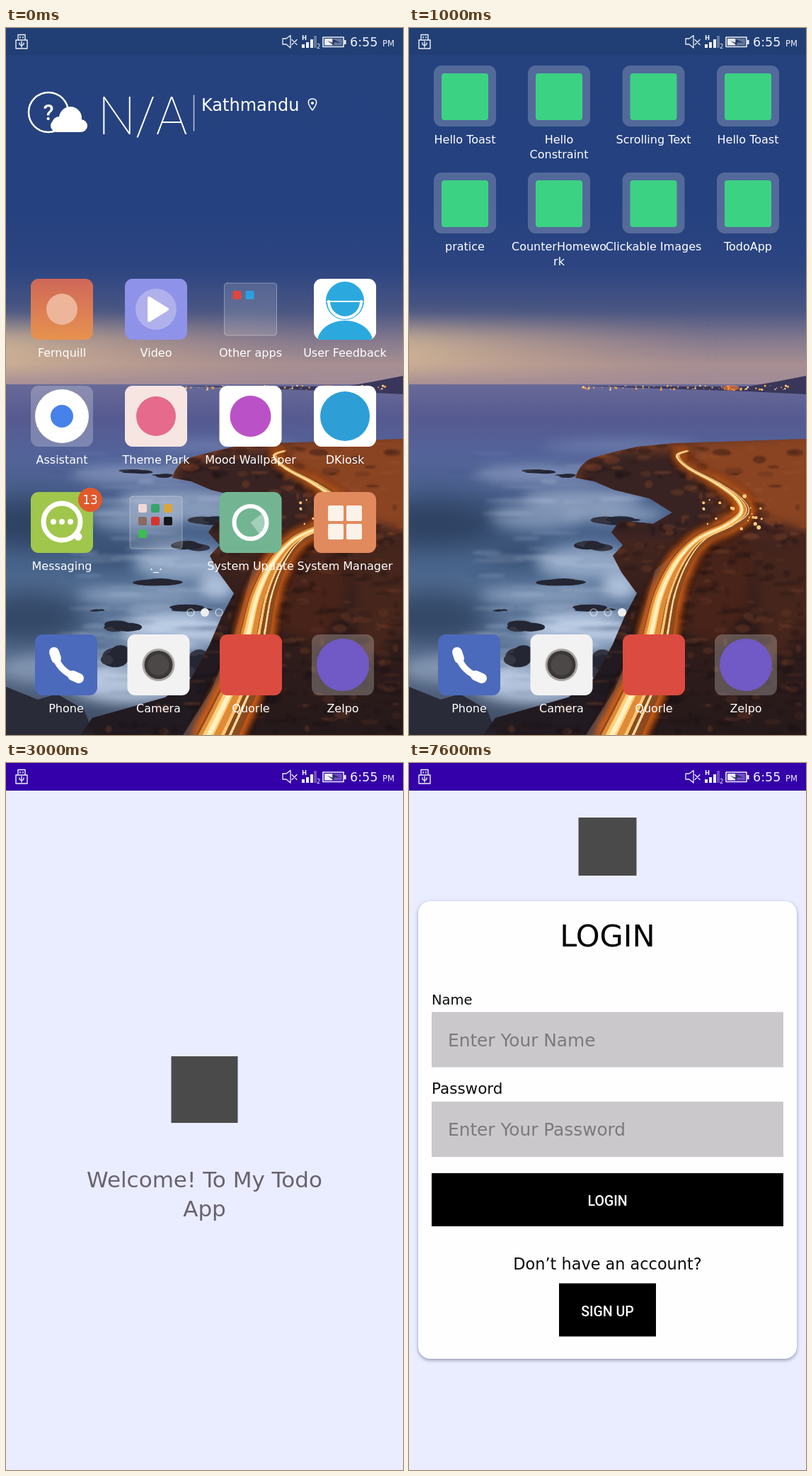
Recreate the animation shown at these times as an HTML page with a canvas. Size 561 px wide and 998 px high, loop 8 s.

```html
<!DOCTYPE html>
<html lang="en">
<head>
<meta charset="utf-8">
<title>Todo app launch</title>
<style>
html, body { margin: 0; width: 100%; height: 100%; overflow: hidden; }
canvas { display: block; width: 100%; height: 100%; }
</style>
</head>
<body>
<canvas id="stage" width="561" height="998"></canvas>
<script>
const W = 561, H = 998, LOOP = 8000;
const HAND = '"DejaVu Sans", sans-serif', UI = 'Roboto, sans-serif';
const stage = document.getElementById('stage').getContext('2d');
let c = stage;

// ---------- helpers ----------
const clamp = v => Math.min(1, Math.max(0, v));
const remain = (t, start, dur, pow) => (1 - clamp((t - start) / dur)) ** pow;
let seed = 7;
const rnd = () => (seed = seed * 16807 % 2147483647) / 2147483647;

function rect(x, y, w, h, fill, r = 0) {
  c.fillStyle = fill;
  c.beginPath();
  c.roundRect(x, y, w, h, r);
  c.fill();
}
function disc(x, y, r, fill, ry = r) {
  c.fillStyle = fill;
  c.beginPath();
  c.ellipse(x, y, r, ry, 0, 0, 7);
  c.fill();
}
function ring(x, y, r, color, w, from = 0, to = 7) {
  c.strokeStyle = color;
  c.lineWidth = w;
  c.beginPath();
  c.arc(x, y, r, from, to);
  c.stroke();
}
function line(path, color, w) {
  c.strokeStyle = color;
  c.lineWidth = w;
  c.stroke(new Path2D(path));
}
function shape(path, fill) {
  c.fillStyle = fill;
  c.fill(new Path2D(path));
}
function text(s, x, y, size, color = '#fff', align = 'left', family = HAND, weight = 400) {
  c.font = `${weight} ${size}px ${family}`;
  c.textAlign = align;
  c.fillStyle = color;
  c.fillText(s, x, y);
}
function gradient(y0, y1, ...stops) {
  const g = c.createLinearGradient(0, y0, 0, y1);
  stops.forEach(([y, color]) => g.addColorStop((y - y0) / (y1 - y0), color));
  return g;
}

// ---------- wallpaper, painted once ----------
const LAND = 'M235 635Q242 612 262 606L292 598 322 591 375 586 440 584 561 580V998H105L122 974 165 962' +
  ' 225 945 262 918 288 870 305 830 322 798 300 768 288 745 302 730 286 712 298 695 345 700 372 684 340 664 290 652 262 640Z';
const FOAM = [[300, 590, 110, 6, .3], [180, 630, 90, 12, .4], [245, 665, 85, 14, .5], [180, 690, 65, 18, .4],
  [290, 686, 70, 9, .6], [250, 755, 70, 24, .55], [190, 800, 90, 12, .45], [240, 850, 75, 28, .8],
  [175, 925, 85, 28, .8], [80, 905, 90, 22, .35], [298, 788, 26, 20, .75]];
const ROCKS = [[185, 626, 24, 3], [220, 632, 16, 3], [215, 782, 44, 7], [168, 845, 34, 9], [290, 696, 32, 7],
  [248, 820, 42, 5], [265, 730, 30, 8], [155, 886, 26, 17], [130, 822, 10, 2], [270, 900, 24, 20]];
// x, y, width along the road
const ROAD = [[394, 597, 5], [380, 604, 7], [396, 621, 8], [435, 642, 11], [466, 664, 15], [474, 684, 19],
  [452, 702, 18], [412, 722, 20], [384, 755, 30], [364, 800, 38], [353, 850, 44], [342, 905, 50], [320, 955, 54], [296, 1005, 58]];

function road(color, share, shift = 0) {
  c.strokeStyle = color;
  for (let i = 0; i < ROAD.length - 1; i++) {
    const [p, q] = [ROAD[i], ROAD[i + 1]];
    const r = ROAD[i + 2] || q, o = ROAD[i - 1] || p;
    const spline = (k, u) => .5 * (2 * p[k] + (q[k] - o[k]) * u +
      (2 * o[k] - 5 * p[k] + 4 * q[k] - r[k]) * u * u + (3 * p[k] - o[k] - 3 * q[k] + r[k]) * u ** 3);
    for (let u = 0; u < 1; u += .1) {
      const w = spline(2, u), v = u + .1;
      c.lineWidth = w * share;
      c.beginPath();
      c.moveTo(spline(0, u) + shift * w, spline(1, u));
      c.lineTo(spline(0, v) + shift * spline(2, v), spline(1, v));
      c.stroke();
    }
  }
}

function paintWallpaper() {
  const layer = document.createElement('canvas');
  layer.width = W;
  layer.height = H;
  c = layer.getContext('2d');
  c.lineCap = c.lineJoin = 'round';

  rect(0, 0, W, 504, gradient(0, 504, [0, '#25427f'], [250, '#25417f'], [340, '#2d4581'], [400, '#4a5683'],
    [440, '#84798e'], [475, '#a78f92'], [504, '#a18a97']));
  const glow = c.createLinearGradient(0, 0, 420, 0);
  glow.addColorStop(0, 'rgba(238,205,150,.6)');
  glow.addColorStop(1, 'rgba(220,170,130,0)');
  c.filter = 'blur(16px)';
  rect(-40, 422, 520, 66, glow);
  c.filter = 'none';

  rect(0, 503, W, 495, gradient(503, 998, [503, '#686a98'], [550, '#565a90'], [600, '#53639a'],
    [680, '#486089'], [760, '#4b678e'], [870, '#667e9f'], [998, '#3a465c']));
  c.filter = 'blur(18px)';
  [[35, 700, 95, 36], [30, 835, 85, 40], [150, 740, 40, 14]].forEach(([x, y, w, h]) => disc(x, y, w, 'rgba(38,57,86,.75)', h));
  c.filter = 'blur(9px)';
  FOAM.forEach(([x, y, w, h, a]) => disc(x, y, w, `rgba(203,218,240,${a})`, h));
  c.filter = 'blur(2px)';
  for (let i = 0; i < 110; i++) {
    const y = 600 + rnd() * 340;
    disc(90 + rnd() * 220, y, 12 + rnd() * 40, `rgba(${i % 2 ? '225,235,250' : '60,82,118'},.16)`, 1 + rnd() * 3);
  }
  c.filter = 'none';
  ROCKS.forEach(([x, y, w, h]) => {
    for (let i = 0; i < 6; i++)
      disc(x + (rnd() - .5) * w, y + (rnd() - .5) * h, w * (.3 + rnd() * .4), i % 3 ? '#242634' : '#343442', h * (.3 + rnd() * .5));
  });

  // distant shore and its lights
  shape('M240 505L360 506 480 506 520 499 561 491V517L480 513 360 509Z', '#38365a');
  for (let i = 0; i < 75; i++)
    disc(245 + rnd() * 310, 505 + rnd() * 6, .6 + rnd() * 1.1, i % 3 ? '#f0a04e' : '#ffd28a');
  disc(455, 508, 12, 'rgba(255,130,50,.6)', 4);

  // headland
  shape(LAND, gradient(580, 998, [580, '#6b3826'], [640, '#6e3820'], [700, '#4a2820'], [800, '#341e1b'], [998, '#26191a']));
  shape('M0 930L45 948 72 940 110 962 125 998H0Z', '#292b38');
  c.save();
  c.clip(new Path2D(LAND));
  c.filter = 'blur(7px)';
  shape('M400 590L570 575V712L500 690Q470 650 420 628Z', '#8a4422');
  shape('M235 625L300 598 370 600 430 655 430 700 380 720 290 720Z', '#382322');
  shape('M395 735L440 710 490 730 480 820 440 870 385 850Z', '#472319');
  shape('M490 745L570 730V850L500 900Z', '#46261c');
  shape('M100 960L270 900 300 840 330 860 270 998H100Z', '#211a20');
  c.filter = 'blur(.8px)';
  for (let i = 0; i < 620; i++) {
    const x = 110 + rnd() * 450, y = 585 + rnd() * 413;
    const tone = rnd() < .55 ? '22,14,18' : y < 730 ? '160,82,42' : '118,64,42';
    disc(x, y, 2 + rnd() * 11, `rgba(${tone},${.15 + rnd() * .25})`, 1 + rnd() * 5);
  }
  c.filter = 'none';
  shape('M348 765L372 745 350 840 318 925 275 998H250L290 935 325 850Z', '#51454a');
  c.filter = 'blur(6px)';
  road('rgba(214,98,24,.35)', 1.15);
  c.filter = 'none';
  road('#8c4a20', .95);
  road('#e08a38', .5, -.2);
  road('#ffd27c', .24, -.24);
  road('#fff1c4', .11, -.22);
  road('#ffc873', .08, .12);
  road('#ffdf9c', .06, .3);
  for (let i = 0; i < 24; i++) disc(415 + rnd() * 85, 660 + rnd() * 52, 1 + rnd() * 2, '#ffcb80');
  c.restore();

  rect(0, 0, W, 38, 'rgba(20,50,80,.22)');
  c = stage;
  return layer;
}
const wallpaper = paintWallpaper();

// ---------- home screen ----------
const COLS = [79, 212, 345.5, 479];
const GLASS = 'rgba(255,255,255,.24)';

function icon(x, y, label, fill, art) {
  if (fill) rect(x - 44, y - 43, 88, 86, fill, 11);
  c.save();
  c.translate(x, y);
  if (art) art();
  c.restore();
  label.split('\n').forEach((s, i) => text(s, x, y + 67 + i * 21, 16, '#fff', 'center'));
}
const dot = (color, r) => () => disc(0, 0, r, color);
function folder(colors) {
  return () => {
    rect(-37, -37, 74, 74, 'rgba(255,255,255,.14)', 4);
    c.strokeStyle = 'rgba(255,255,255,.35)';
    c.lineWidth = 1;
    c.stroke();
    colors.forEach((color, i) => rect(-25 + i % 3 * 18, -26 + (i / 3 | 0) * 18, 12, 12, color, 2));
  };
}
function play() {
  disc(0, 0, 29, 'rgba(225,220,240,.4)');
  const tri = 'M-10-16L16 0-10 16Z';
  shape(tri, '#fff');
  line(tri, '#fff', 4);
}
function person() {
  c.beginPath();
  c.roundRect(-44, -43, 88, 86, 11);
  c.clip();
  disc(0, -12, 27, '#2ba9df');
  ring(0, -11, 23, '#fff', 4, 0, Math.PI);
  line('M-25-11H25', '#fff', 2);
  disc(0, 46, 39, '#2ba9df', 30);
}
function chat() {
  ring(0, -1, 26, '#fff', 7);
  [-12, 0, 12].forEach(x => disc(x, -1, 4, '#fff'));
  disc(23, 20, 5.5, '#fff');
  disc(40, -32, 17, '#e0592c');
  text('13', 40, -26, 17, '#fff', 'center');
}
function update() {
  ring(0, 0, 23, '#fff', 6);
  shape('M0 0L18-14A23 23 0 0 1 14 18Z', 'rgba(255,255,255,.35)');
}
function grid() {
  [-24, 2].forEach(x => [-24, 2].forEach(y => rect(x, y, 22, 22, '#fbf2ea', 2)));
}
function handset() {
  line('M-17-17Q-11 10 17 18', '#fff', 9);
  line('M-17-18L-14-9M9 15L18 19', '#fff', 14);
}
function lens() {
  disc(0, 0, 23, '#aaa5a2');
  disc(0, 0, 20, '#3b3838');
  disc(0, 0, 15, '#4c4848');
}

function weather() {
  ring(60, 119, 28, '#fff', 2.5);
  text('?', 60, 130, 31, '#fff', 'center', UI, 500);
  rect(63, 129, 52, 18, '#fff', 9);
  disc(91, 127, 16, '#fff');
  disc(75, 135, 10, '#fff');
  text('N/A', 130, 150, 75, '#fff', 'left', UI, 100);
  line('M265.5 95V145', 'rgba(255,255,255,.7)', 1.5);
  text('Kathmandu', 276, 117, 24);
  line('M433 116C424 105 427 100 433 100S442 105 433 116Z', '#fff', 1.5);
  disc(433, 106, 2, '#fff');
}

function appsPage() {
  weather();
  const [a, b, d, e] = COLS;
  icon(a, 397, 'Fernquill', gradient(354, 440, [354, '#cf6759'], [440, '#e7924f']), dot('#edb59a', 22));
  icon(b, 397, 'Video', '#8f92e9', play);
  icon(d, 397, 'Other apps', null, folder(['#e0463c', '#2f9fdc']));
  icon(e, 397, 'User Feedback', '#fff', person);
  icon(a, 548, 'Assistant', GLASS, () => { disc(0, 0, 38, '#fff'); disc(0, 0, 16, '#4682ea'); });
  icon(b, 548, 'Theme Park', '#f6e5e1', dot('#e56a8b', 28));
  icon(d, 548, 'Mood Wallpaper', '#fff', dot('#bb51c6', 29));
  icon(e, 548, 'DKiosk', '#fff', dot('#2d9fd6', 35));
  icon(a, 698, 'Messaging', '#a0c64c', chat);
  icon(b, 698, '._.', null, folder(['#f0d8d8', '#35a36a', '#d9a63c', '#8a6a60', '#d8322c', '#151519', '#3dbb57']));
  icon(d, 698, 'System Update', '#73b593', update);
  icon(e, 698, 'System Manager', '#e18a5d', grid);
}
const PROJECTS = ['Hello Toast', 'Hello\nConstraint', 'Scrolling Text', 'Hello Toast',
  'pratice', 'CounterHomewo\nrk', 'Clickable Images', 'TodoApp'];
function projectsPage() {
  PROJECTS.forEach((name, i) => icon(COLS[i % 4], i < 4 ? 96 : 247, name, 'rgba(255,255,255,.21)',
    () => rect(-33, -32, 66, 66, '#3cd283', 4)));
}

// off: distance from the centred position, in screens
function page(off, draw) {
  const far = Math.abs(off), alpha = 1 - 1.5 * far;
  if (alpha <= 0) return;
  c.save();
  c.globalAlpha = alpha;
  c.translate(280 + off * W, 413);
  c.scale(1 - .53 * far, 1 - .53 * far);
  c.translate(-280, -413);
  draw();
  c.restore();
}

function home(t) {
  c.drawImage(wallpaper, 0, 0);
  const off = remain(t, 465, 535, 5);
  page(off - 1, appsPage);
  page(off, projectsPage);
  const active = off > .5 ? 1 : 2;
  [261, 281, 301].forEach((x, i) => i === active ? disc(x, 825, 6, '#eee') : ring(x, 825, 5, 'rgba(255,255,255,.5)', 1.6));
  icon(85, 899, 'Phone', '#4b6abc', handset);
  icon(215.5, 899, 'Camera', '#f2f2f2', lens);
  icon(346, 899, 'Quorle', '#dc4b3f');
  icon(476, 899, 'Zelpo', GLASS, dot('#7159c6', 37));
}

// ---------- todo app ----------
const PAPER = '#eaedff', BAR = '#3400a9', MARK = '#4a4a4a';

function splash(t) {
  const y = H * remain(t, 2080, 520, 2);
  const ready = t >= 2900;
  c.save();
  c.translate(0, y);
  c.globalAlpha = clamp(.2 + 1.7 * (t - 2080) / 520);
  rect(0, 39, W, H, ready ? PAPER : '#fafafa');
  c.globalAlpha = 1;
  rect(0, 0, W, 39, BAR);
  c.restore();
  if (!ready) return;
  const x = 280.5 - W / 3 * (1 - remain(t, 6000, 600, 3.75));
  rect(x - 47, 414, 94, 94, MARK);
  text('Welcome! To My Todo', x, 599, 31, '#68636f', 'center');
  text('App', x, 640, 31, '#68636f', 'center');
}

function field(y, label, size, hint) {
  text(label, 32, y - 11, size, '#0c0c0c');
  rect(32, y, 497, 78, '#cac8cb');
  text(hint, 55, y + 48, 24.8, '#7d797d');
}
function button(x, y, w, label) {
  rect(x, y, w, 75, '#000');
  text(label, 280.5, y + 46, 19.5, '#fff', 'center', UI, 500);
}
function login(t) {
  const off = remain(t, 6000, 600, 3.75);
  if (off === 1) return;
  rect(0, 39, W, H, `rgba(20,40,60,${.12 * (1 - off)})`);
  c.save();
  c.translate(Math.round(off * W) - (off > 0 ? 5 : 0), 0);
  rect(0, 39, W + 6, H, PAPER);
  rect(239.5, 77, 82, 82, MARK);
  c.shadowColor = 'rgba(40,45,80,.45)';
  c.shadowBlur = 5;
  c.shadowOffsetY = 2;
  rect(13, 195, 535, 646, '#fffeff', 17);
  c.shadowColor = 'transparent';
  text('LOGIN', 280.5, 259, 43, '#000', 'center');
  field(351.5, 'Name', 19.5, 'Enter Your Name');
  field(478, 'Password', 21.5, 'Enter Your Password');
  if (Math.floor((t - 6100) / 500) % 2 === 0) rect(55.5, 375, 2.5, 32, '#148a7c');
  button(32, 579, 497, 'LOGIN');
  text('Don’t have an account?', 280.5, 715, 22.4, '#0c0c0c', 'center');
  button(212, 734.5, 137, 'SIGN UP');
  c.restore();
  rect(0, 0, W, 39, BAR);
}

function statusBar() {
  const ink = '#eef0f8';
  line('M14 17H30V29H14ZM17 17V9.5H27V17M20 12.5V14M24 12.5V14M22 19V27M19 21V23L22 25 25 23V21', ink, 1.4);
  line('M391 15H396L402 10.5V28L396 23H391ZM404 16.5L411 23.5M411 16.5L404 23.5', ink, 1.3);
  text('H', 418, 17, 8.5, ink, 'left', HAND, 700);
  [[418, 5], [424, 8], [430, 12]].forEach(([x, h]) => rect(x, 28 - h, 4, h, ink));
  rect(435, 11, 4, 17, 'rgba(255,255,255,.3)');
  text('2', 439, 29, 8.5, ink);
  line('M448 13H477V26.5H448Z', ink, 1.6);
  rect(478, 17, 2.5, 6, ink);
  rect(450, 15, 11, 9.5, ink);
  rect(461, 15, 14, 9.5, 'rgba(255,255,255,.3)');
  shape('M454 18L462 21 462 16 473 21 464 20 463 24Z', '#272f63');
  text('6:55', 486, 25.5, 17.5, ink);
  text('PM', 532, 25.5, 11.5, ink);
}

function draw(now) {
  const t = Math.floor(now % LOOP / 100) * 100;
  c.lineCap = c.lineJoin = 'round';
  if (t < 2600) home(t);
  if (t >= 2100) splash(t);
  if (t >= 6100) login(t);
  statusBar();
}

const start = performance.now();
function tick() {
  draw(performance.now() - start);
  requestAnimationFrame(tick);
}
tick();
</script>
</body>
</html>
```
